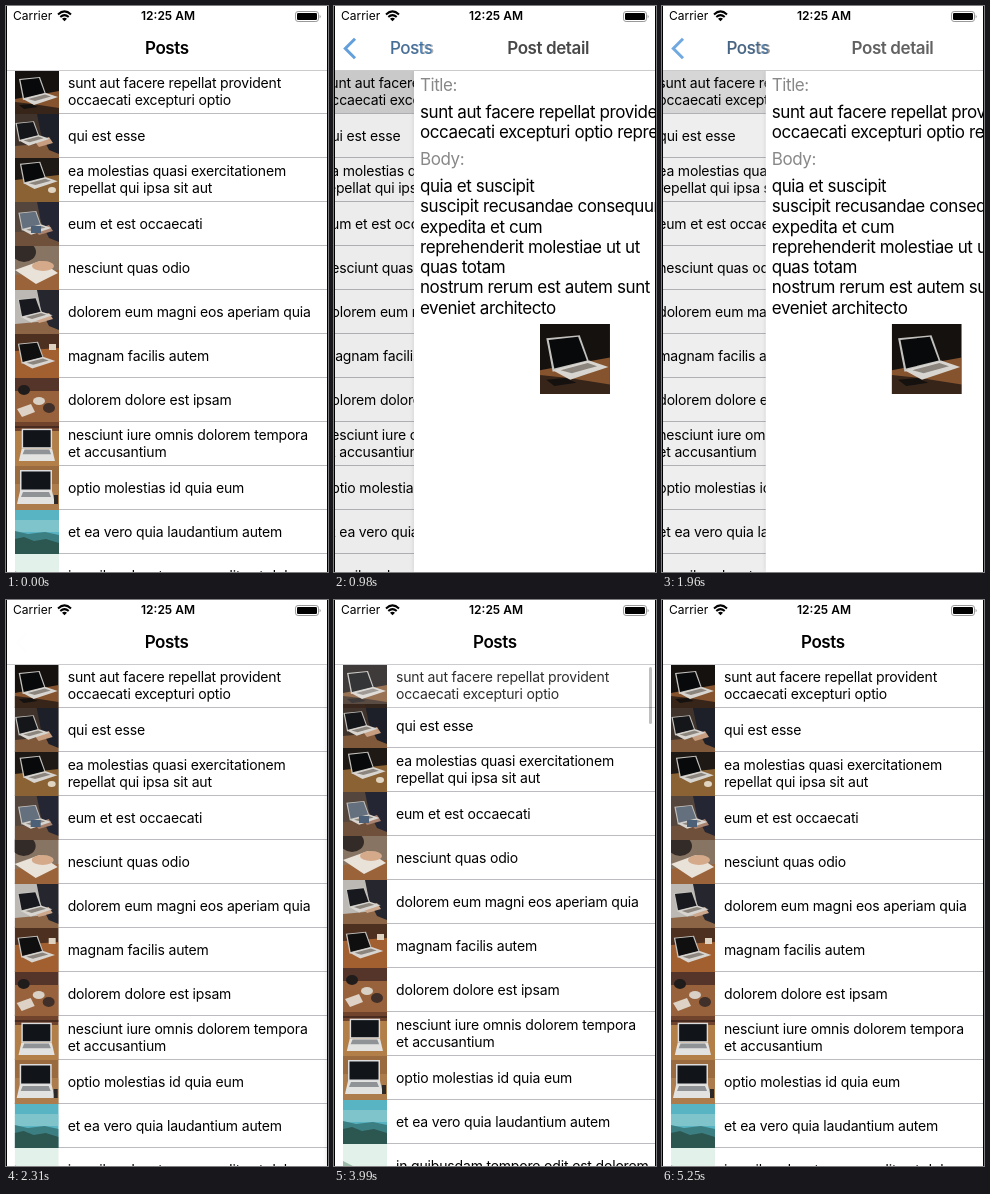
Write an HTML page that moves like this. It is 322x566 px and loops after 5320 ms.

```html
<!DOCTYPE html>
<html lang="en">
<head>
<meta charset="utf-8">
<title>Posts</title>
<style>
html, body { margin: 0; width: 100%; height: 100%; overflow: hidden; background: #fff; }
body { font-family: Inter, Roboto, sans-serif; font-optical-sizing: none; color: #000; }
#stage { position: absolute; left: 0; top: 0; width: 322px; height: 566px; overflow: hidden; background: #fff; }
#stage div, #stage span, #stage svg { position: absolute; white-space: nowrap; }
#list, #detail { left: 0; top: 65px; width: 322px; height: 501px; background: #fff; overflow: hidden; }
#rows { left: 0; top: -1px; width: 322px; }
.row { left: 0; width: 322px; height: 44px; background: #fff; }
.row::after { content: ""; position: absolute; left: 9px; right: 0; top: 43px; height: 1px; background: #bcbbc0; }
.row svg { left: 9px; top: 0; width: 44px; height: 44px; z-index: 1; }
.row span { left: 62px; top: 50%; transform: translateY(-50%); font-size: 14px; line-height: 16.7px; letter-spacing: -.17px; }
#glow { left: 0; top: 0; width: 322px; height: 43px; background: #d9d9d9; }
#dim { inset: 0; background: #000; }
#bar { right: 4px; top: 2px; width: 3px; height: 57px; border-radius: 2px; background: #000; }
#detail { box-shadow: 0 0 5px rgba(0, 0, 0, .16); overflow: visible; }
#detail span { left: 6px; font-size: 17px; line-height: 20.29px; letter-spacing: -.41px; }
#detail .cap { color: #888; }
#detail svg { left: 126px; top: 253px; width: 70px; height: 70px; }
#nav { left: 0; top: 0; width: 322px; height: 64px; background: #fff; border-bottom: 1px solid #cbcbcd; }
.title, .back { top: 31px; left: 0; font-size: 17px; line-height: 22px; letter-spacing: -.41px; }
.title { font-weight: 600; }
.back { color: #2f80d0; }
.status { top: 2px; font-size: 12px; line-height: 16px; }
#edge { inset: 0; border: solid #000; border-width: 0 1px; }
</style>
</head>
<body>
<div id="stage">
  <div id="list">
    <div id="rows"></div>
    <div id="bar"></div>
    <div id="dim"></div>
  </div>
  <div id="detail"></div>
  <div id="nav">
    <span class="status" style="left:7px">Carrier</span>
    <svg style="left:51px;top:4px" width="15" height="12" viewBox="0 0 15 12" fill="none" stroke="#000" stroke-width="2">
      <path d="M1 4.4Q7.5 -1.6 14 4.4M3.3 7Q7.5 3.2 11.7 7"/>
      <path d="M5 8.7Q7.5 6.8 10 8.7L7.5 11.3Z" fill="#000" stroke="none"/>
    </svg>
    <span class="status" style="left:135px;font-weight:600">12:25 AM</span>
    <svg style="left:289px;top:5px" width="27" height="11" viewBox="0 0 27 11">
      <rect x=".5" y=".5" width="23" height="10" rx="2.6" fill="none" stroke="#999"/>
      <rect x="2" y="2" width="20" height="7" rx="1.2"/>
      <path d="M24.7 3.7Q26.6 5.5 24.7 7.3Z" fill="#888"/>
    </svg>
    <svg id="chevron" style="left:9px;top:31px" width="14" height="23" fill="none" stroke="#2f80d0" stroke-width="3">
      <path d="M12 1.7L2.3 11.5L12 21.3"/>
    </svg>
    <span class="back" id="back">Posts</span>
    <span class="title" id="posts">Posts</span>
    <span class="title" id="heading">Post detail</span>
  </div>
  <div id="edge"></div>
</div>
<script>
const LOOP = 5320, STEP = 70, ROW = 44;
const PUSH = 840, POP = 1900, RATE = 19.3;
const $ = id => document.getElementById(id);

// Photo parts, all in a 44 x 44 box
const poly = (fill, points) => `<polygon fill="${fill}" points="${points}"/>`;
const rect = (fill, x, y, w, h) => `<rect fill="${fill}" x="${x}" y="${y}" width="${w}" height="${h}"/>`;
const oval = (fill, x, y, rx, ry) => `<ellipse fill="${fill}" cx="${x}" cy="${y}" rx="${rx}" ry="${ry}"/>`;
const move = (x, y, k, part) => `<g transform="translate(${x} ${y}) scale(${k})">${part}</g>`;
const desk = (back, wood, left, right) => rect(back, 0, 0, 44, 44) + poly(wood, `0,${left} 44,${right} 44,44 0,44`);

const angled = screen =>
  poly("#c4c2be", "4,9 25,7 31,24 8,30") + poly(screen, "5.5,10 24,8 29.5,23 9,28") +
  poly("#d8d5d0", "8,29 31,23 43,27 19,35") + poly("#8b857e", "13,29 30,24.5 36,26.5 20,31");
const front = poly("#ddd", "6,6 38,6 38,27 6,27") + rect("#11151a", 7.5, 7.5, 29, 18) +
  poly("#e2e2e0", "6,27 38,27 41,40 3,40") + poly("#909396", "9,28 35,28 37,33 7,33");
const sitter = (coat, skin) => poly(coat, "22,0 44,0 44,40 34,36 26,20") + poly(skin, "20,28 34,23 38,29 24,33");

const photos = [
  desk("#15110f", "#85542f", 29, 21) + poly("#38251a", "0,32 18,34 44,38 44,44 0,44") + angled("#07090b") + poly("#15110f", "4,35 16,34 23,37 9,39"),
  desk("#3f332c", "#80583a", 32, 28) + sitter("#1d2029", "#c79d80") + move(-3, 1, .88, angled("#151619")),
  desk("#1f1915", "#8a6233", 22, 17) + move(1, -3, .97, angled("#08090a")) + oval("#e0d5c1", 37, 32, 4, 3),
  desk("#54463d", "#6f503b", 30, 28) + sitter("#252633", "#a98370") + move(0, 3, .85, angled("#64707d")) + rect("#4c6077", 16, 24, 10, 7),
  desk("#887462", "#9a6339", 29, 24) + oval("#332b28", 9, 6, 12, 10) + poly("#e9e2d9", "0,24 25,15 43,27 21,38") + oval("#d4aa8b", 28, 20, 11, 5),
  desk("#bcb8b3", "#8c6547", 34, 30) + sitter("#25262e", "#cda78c") + move(-1, 1, .9, angled("#17191e")),
  desk("#4d3020", "#a26031", 17, 14) + move(-1, 1, .96, angled("#100f10")) + rect("#ded2c1", 34, 10, 7, 6),
  desk("#553529", "#98633c", 13, 13) + oval("#201c1b", 9, 12, 6, 5) + oval("#d9d0c6", 24, 23, 6, 4) + oval("#413029", 34, 30, 6, 5) + poly("#ddd2c5", "2,31 16,26 20,34 7,39"),
  desk("#70442c", "#b27f49", 9, 9) + rect("#492b20", 0, 4, 44, 2) + move(1, 1, .95, front),
  desk("#9b6b40", "#ad7c4c", 18, 18) + move(-1, -2, 1, front) + rect("#2d2926", 39, 29, 4, 9),
  rect("#58b3c2", 0, 0, 44, 44) + rect("#7fc3cb", 0, 10, 44, 12) + poly("#3c7f83", "0,21 13,24 30,22 44,25 44,44 0,44") + poly("#2c5650", "0,29 9,27 19,31 31,29 44,33 44,44 0,44"),
  rect("#e2f2ea", 0, 0, 44, 44) + poly("#9dbba9", "0,17 14,24 27,44 0,44") + poly("#43604d", "0,24 10,25 19,44 0,44")
];
const photo = i => `<svg viewBox="0 0 44 44"><g style="filter:blur(.5px)">${photos[i]}</g></svg>`;

const titles = [
  "sunt aut facere repellat provident<br>occaecati excepturi optio",
  "qui est esse",
  "ea molestias quasi exercitationem<br>repellat qui ipsa sit aut",
  "eum et est occaecati",
  "nesciunt quas odio",
  "dolorem eum magni eos aperiam quia",
  "magnam facilis autem",
  "dolorem dolore est ipsam",
  "nesciunt iure omnis dolorem tempora<br>et accusantium",
  "optio molestias id quia eum",
  "et ea vero quia laudantium autem",
  "in quibusdam tempore odit est dolorem"
];
$("rows").innerHTML = titles.map((text, i) =>
  `<div class="row" style="top:${i * ROW}px">${i ? "" : '<div id="glow"></div>'}${photo(i)}<span>${text}</span></div>`).join("");
const rows = [...document.querySelectorAll(".row")];
rows[0].style.zIndex = 1;

const label = (top, text, kind = "") => `<span class="${kind}" style="top:${top}px">${text}</span>`;
$("detail").innerHTML =
  label(4, "Title:", "cap") +
  label(31, "sunt aut facere repellat provident<br>occaecati excepturi optio reprehenderit") +
  label(78, "Body:", "cap") +
  label(105, "quia et suscipit<br>suscipit recusandae consequuntur<br>expedita et cum<br>reprehenderit molestiae ut ut<br>quas totam<br>nostrum rerum est autem sunt rem<br>eveniet architecto") +
  photo(0);

const clamp = v => Math.min(1, Math.max(0, v));
const mix = (a, b, p) => a + (b - a) * p;
const spring = ms => {
  const u = Math.max(0, ms) / 1000 * RATE;
  return u > 9 ? 1 : 1 - (1 + u) * Math.exp(-u);
};
// Eased value from [time, value] stops
const track = (t, stops) => {
  const i = stops.findIndex(s => s[0] > t);
  if (i < 0) return stops[stops.length - 1][1];
  if (!i) return stops[0][1];
  const [a, b] = [stops[i - 1], stops[i]];
  const p = (t - a[0]) / (b[0] - a[0]);
  return mix(a[1], b[1], p * p * (3 - 2 * p));
};
const shift = (el, x, y = 0) => { el.style.transform = `translate(${x}px, ${y}px)`; };
const fade = (el, v) => { el.style.opacity = v; };

function draw(t) {
  const back = spring(t - POP);
  const p = t < POP ? spring(t - PUSH) : 1 - back;

  shift($("list"), -97 * p);
  fade($("dim"), .1 * p);
  shift($("detail"), 322 * (1 - p));
  $("detail").style.visibility = p > .002 ? "visible" : "hidden";
  fade($("glow"), t < 700 ? 0 : 1 - back);

  const labelX = mix(139, 26.5, p * .96 + .04 * p * p * p);
  shift($("posts"), labelX);
  shift($("back"), labelX);
  fade($("posts"), clamp((1 - p) * 1.25));
  fade($("back"), p);
  fade($("chevron"), p);
  shift($("heading"), mix(339, 118.5, p));
  fade($("heading"), clamp(p * 1.35 - .3));

  const pull = track(t, [[3520, 0], [3730, 40], [3930, 0]]);
  const lift = track(t, [[3900, 0], [3990, -4], [4140, 0]]);
  shift($("rows"), 0, pull);
  rows.forEach((row, i) => shift(row, 0, i ? lift : 0));
  fade(rows[0], 1 + lift * .045);
  fade($("bar"), track(t, [[3420, 0], [3490, .36], [3920, .36], [3990, .25], [4200, 0]]));
}

const start = performance.now();
function tick() {
  const t = (performance.now() - start) % LOOP;
  draw(Math.floor(t / STEP) * STEP);
  requestAnimationFrame(tick);
}
tick();
</script>
</body>
</html>
```
